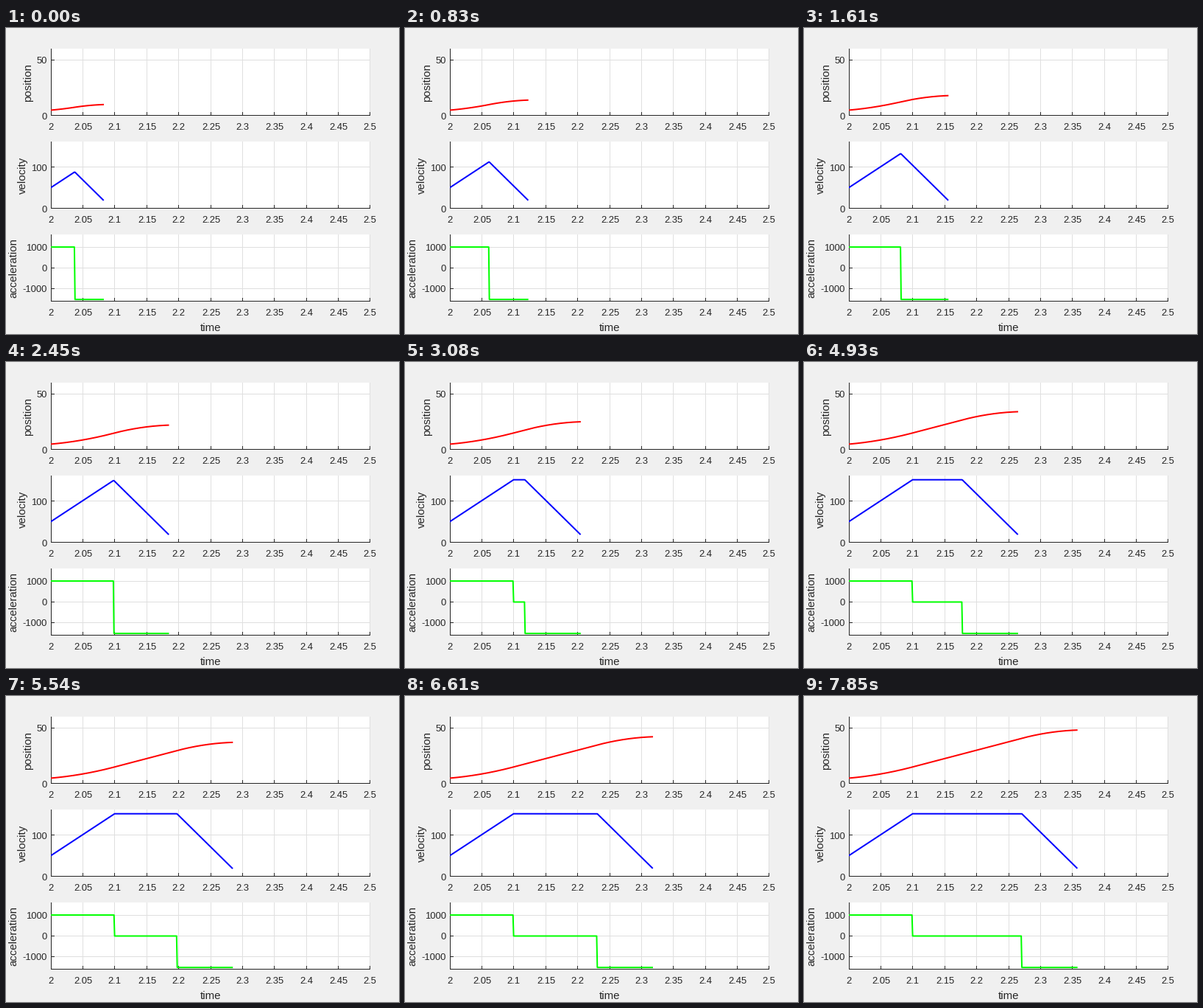
Animation of 534x415 px, one loop 8 s. Source, as a matplotlib script:

```python
import numpy as np
import matplotlib.pyplot as plt
from matplotlib.animation import FuncAnimation
from matplotlib.collections import LineCollection
from matplotlib.patches import Rectangle

W, H, DPI = 534, 415, 64
PX = 72 / DPI                      # points per pixel
LOOP, STEP = 8000, 20              # ms
INK, GRID = "#262626", "#dfdfdf"

# Plot geometry in pixels
LEFT, WIDTH, HEIGHT = 61, 434, 91
CURVE_LEFT = 60.8
BOTTOMS = [119, 245, 371]

# Motion limits: start position, start / end / top speed, accel, decel
Q0, V0, V1, VMAX, ACC, DEC = 5, 50, 20, 150, 1000, 1500
T0, SPAN, DT = 2, 0.5, 0.001
FIRST_GOAL = 10

# How long each goal stays on screen, in ms
HOLDS = ([150, 230, 230, 140, 230, 230, 170, 230, 230, 230]
         + 3 * [150, 230, 230, 170, 230, 230, 150, 230, 230, 230])
STARTS = np.cumsum([0] + HOLDS)

# label, label baseline x, colour, limits, ticks
PLOTS = [
    ("position", 34, "#ff0000", (0, 60), (0, 50)),
    ("velocity", 26.6, "#0000ff", (0, 160), (0, 100)),
    ("acceleration", 14.6, "#00ff00", (-1600, 1600), (-1000, 0, 1000)),
]

plt.rcParams["font.family"] = "Liberation Sans"
fig = plt.figure(figsize=(W / DPI, H / DPI), dpi=DPI, facecolor="#f0f0f0")
ax = fig.add_axes([0, 0, 1, 1])
ax.set(xlim=(0, W), ylim=(H, 0))
ax.axis("off")


def pixel(v):
    """Centre of the pixel that holds v."""
    return np.floor(v) + 0.5


def to_y(value, bottom, limits):
    lo, hi = limits
    return bottom - (value - lo) / (hi - lo) * HEIGHT


def label(x, y, text, size=13, ha="center", **kw):
    ax.text(x, y, text, fontsize=size * PX, color=INK, ha=ha,
            va="baseline", **kw)


def segments(lines, color, z):
    # Ends are already on pixel centres, so snapping would shift them
    ax.add_collection(LineCollection(lines, colors=color, linewidths=PX,
                                     capstyle="butt", snap=False, zorder=z))


def draw_plot(bottom, name, name_x, limits, ticks):
    top, right = bottom - HEIGHT, LEFT + WIDTH
    ax.add_patch(Rectangle((LEFT, top), WIDTH, HEIGHT, fc="white",
                           lw=0, zorder=0))
    x0, y0 = LEFT + 0.5, bottom - 0.5
    grid = []
    dark = [[(LEFT, y0), (right, y0)], [(x0, top), (x0, bottom)]]
    for i in range(11):
        x = min(pixel(LEFT + i * WIDTH / 10), right - 0.5)
        grid.append([(x, top), (x, bottom)])
        dark.append([(x, bottom), (x, bottom - 5)])
        label(x, bottom + 19, f"{T0 + i * 0.05:.3g}")
    for tick in ticks:
        y = min(pixel(to_y(tick, bottom, limits)), y0)
        grid.append([(LEFT, y), (right, y)])
        dark.append([(LEFT, y), (LEFT + 5, y)])
        label(56, y + 5, str(tick), ha="right")
    segments(grid, GRID, 1)
    segments(dark, INK, 2)
    label(name_x, bottom - HEIGHT / 2, name, 15,
          rotation=90, rotation_mode="anchor")


def profile(goal):
    """Sampled trapezoidal profile: time, (position, velocity, acceleration)."""
    reach = goal - Q0 + V0**2 / (2 * ACC) + V1**2 / (2 * DEC)
    ramp = 1 / (2 * ACC) + 1 / (2 * DEC)
    peak = min(VMAX, np.sqrt(reach / ramp))
    up, down = (peak - V0) / ACC, (peak - V1) / DEC
    cruise = (reach - ramp * peak**2) / peak
    t = np.arange(0, up + cruise + down, DT)
    a = np.clip(t, 0, up)
    b = np.clip(t - up, 0, cruise)
    c = np.clip(t - up - cruise, 0, down)
    pos = Q0 + V0 * a + ACC * a**2 / 2 + peak * (b + c) - DEC * c**2 / 2
    vel = V0 + ACC * a - DEC * c
    acc = np.where(t < up, ACC, np.where(t < up + cruise, 0, -DEC))
    return t, (pos, vel, acc)


curves = []
for bottom, (name, name_x, color, limits, ticks) in zip(BOTTOMS, PLOTS):
    draw_plot(bottom, name, name_x, limits, ticks)
    curve, = ax.plot([], [], color=color, lw=2 * PX, zorder=3,
                     solid_capstyle="projecting", solid_joinstyle="round")
    curve.set_clip_path(Rectangle((LEFT, bottom - HEIGHT), WIDTH, HEIGHT,
                                  transform=ax.transData))
    curves.append(curve)
label(LEFT + WIDTH / 2, 411, "time", 15)


def update(frame):
    now = frame * STEP + STEP / 2
    n = np.searchsorted(STARTS, now, side="right") - 1
    t, values = profile(FIRST_GOAL + n)
    x = CURVE_LEFT + t / SPAN * WIDTH
    for curve, value, bottom, plot in zip(curves, values, BOTTOMS, PLOTS):
        curve.set_data(x, to_y(value, bottom, plot[3]))
    return curves


anim = FuncAnimation(fig, update, frames=LOOP // STEP, interval=STEP,
                     repeat=True, repeat_delay=0)
plt.show()
```
